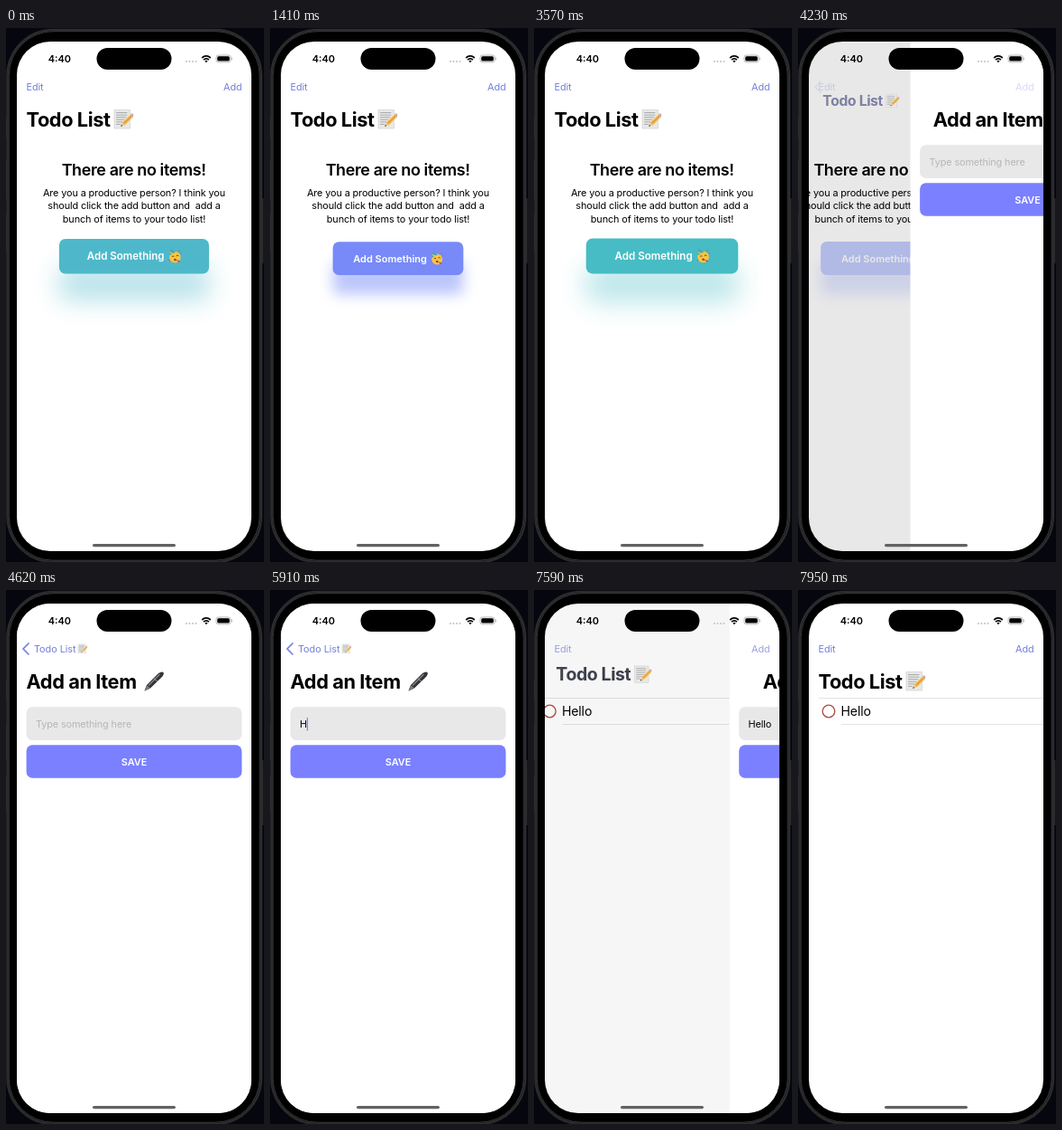
An HTML page that plays this animation: 286x590 px, repeating every 8 s.

```html
<!DOCTYPE html>
<html lang="en">
<head>
<meta charset="utf-8">
<title>Todo List</title>
<style>
  /* --p: button pulse, --q: page push, --n: letters typed */
  @property --p { syntax: "<number>"; inherits: true; initial-value: 0; }
  @property --q { syntax: "<number>"; inherits: true; initial-value: 0; }
  @property --n { syntax: "<number>"; inherits: true; initial-value: 0; }

  html, body { margin: 0; width: 100%; height: 100%; overflow: hidden; background: #06070e; }

  svg.stage {
    --link: #747fdc;
    display: block; width: 100%; height: 100%;
    font: 10.9px Inter, "Open Sans", sans-serif;
    letter-spacing: -.012em;
    animation: pulse 8s linear infinite, push 8s linear infinite, type 8s step-end infinite;
  }
  text { white-space: pre; }
  .mid { text-anchor: middle; }
  .semi { font-weight: 600; letter-spacing: 0; }
  .large { font-size: 21.8px; font-weight: 700; letter-spacing: -.02em; }
  .heading { font-size: 17.95px; font-weight: 600; letter-spacing: -.021em; }
  .link { fill: var(--link); }

  @keyframes pulse {
    0% { --p: .6; animation-timing-function: cubic-bezier(.35, .51, .64, 1); }
    12.8% { --p: 0; animation-timing-function: ease-in-out; }
    35.4% { --p: 1; animation-timing-function: ease-in-out; }
    58%, 100% { --p: 0; }
  }
  /* Both page moves follow a critically damped spring */
  @keyframes push {
    0% { --q: 0; }
    51% { --q: 0; animation-timing-function: linear(0, .15, .4, .61, .76, .86, .92, .955, .975, .988, 1); }
    57.75% { --q: 1; }
    91.6% { --q: 1; animation-timing-function: linear(0, .15, .4, .61, .76, .86, .92, .955, .975, .988, 1); }
    99.3%, 100% { --q: 0; }
  }
  @keyframes type {
    0% { --n: 0; }
    73.875% { --n: 1; }
    77.625% { --n: 2; }
    78% { --n: 3; }
    79.875% { --n: 4; }
    81.75%, 100% { --n: 5; }
  }

  .list { transform: translateX(calc(var(--q) * -78px)); }
  .dim { opacity: calc(var(--q) * .16); }
  .form { transform: translateX(calc((1 - var(--q)) * 260px)); }
  .form .large, .form .pen { transform: translateX(calc((1 - var(--q)) * 34px)); }
  .actions { opacity: calc(1 - var(--q) * 1.25); }
  .chevron { opacity: calc(2 * var(--q) - 1); }
  .title {
    transform: translate(calc(22.5px + 8.5px * var(--q)), calc(109px - 40px * var(--q)))
               scale(calc(1 - .5 * var(--q)));
  }
  .title .large { opacity: calc(1 - var(--q)); }
  .title .back { font-size: 21.8px; opacity: var(--q); }

  .empty { animation: leave 8s step-end infinite; }
  .rows { animation: enter 8s step-end infinite; }
  @keyframes leave { 0% { visibility: visible; } 80%, 100% { visibility: hidden; } }
  @keyframes enter { 0% { visibility: hidden; } 80%, 100% { visibility: visible; } }

  .button {
    --w: calc(140.9px + 26.5px * var(--p));
    --tint: rgb(calc(122 - 25 * var(--p) - 80 * var(--p) * var(--p)),
                calc(128 + 103 * var(--p) - 17 * var(--p) * var(--p)),
                calc(255 - 77 * var(--p) - 20 * var(--p) * var(--p)));
    transform: translate(142px, calc(255px - 4.6px * var(--p))) scale(calc(1 + .1 * var(--p)));
    animation: tap 8s linear infinite;
  }
  @keyframes tap {
    0%, 50.8% { opacity: 1; }
    51.3% { opacity: .25; }
    57.5%, 100% { opacity: 1; }
  }
  .button rect {
    x: calc(var(--w) / -2); y: -18.2px; width: var(--w); height: 36.4px; rx: 6.6px;
    fill: var(--tint);
  }
  .button .shadow {
    y: calc(1.8px + 13.2px * var(--p));
    opacity: calc(.5 - .17 * var(--p));
    filter: blur(calc(6px + 12px * var(--p)));
  }

  .hint { fill: #b6b6ba; opacity: calc(1 - var(--n)); }
  .typed tspan { fill-opacity: calc(var(--n) - var(--i)); }
  .caret { fill: #8088f5; animation: caret-x 8s step-end infinite, blink 8s linear infinite; }
  @keyframes caret-x {
    0% { transform: none; }
    73.875% { transform: translateX(8px); }
    77.625% { transform: translateX(14.2px); }
    78% { transform: translateX(16.7px); }
    79.875% { transform: translateX(19.2px); }
    81.75%, 100% { transform: translateX(25.6px); }
  }
  @keyframes blink {
    0%, 64.87% { opacity: 0; }
    64.875%, 70.6% { opacity: 1; }
    72%, 73.87% { opacity: 0; }
    73.875%, 87.5% { opacity: 1; }
    89.25%, 100% { opacity: 0; }
  }
</style>
</head>
<body>
<svg class="stage" viewBox="0 0 286 590">
  <defs>
    <clipPath id="screen"><rect x="12" y="15" width="260" height="563" rx="37"/></clipPath>

    <symbol id="memo" viewBox="0 0 22 22">
      <path d="M1 1H18V21H1Z" fill="#e9e9e6" stroke="#c9c9c6" stroke-width=".6"/>
      <path d="M3 4H15M3 6.5H15M3 9H14M3 11.5H12M3 14H10M3 16.5H8" stroke="#a0a3a8" stroke-width=".9"/>
      <path d="M8 19L9.800 14.500L18.500 6L21.200 8.800L12.600 17.300Z" fill="#f3b94a"/>
      <path d="M11.300 15.800L19.800 7.400" stroke="#dd9432" stroke-width="1"/>
      <path d="M8 19L9.800 14.500L12.600 17.300Z" fill="#e5cda5"/>
      <path d="M8 19L8.800 17L10 18.200Z" fill="#333"/>
      <path d="M18.500 6L19.500 5Q21 4.600 21.900 6Q22.300 7.200 21.200 8.800Z" fill="#d3a69a"/>
    </symbol>

    <symbol id="pen" viewBox="0 0 24 24">
      <path d="M1.5 22.5L4 16L17 3Q20.5 .5 22.5 2Q23.5 4 21 7L8 19.5Z" fill="#333439"/>
      <path d="M6 16.5L18.5 4" stroke="#85878d" stroke-width="1.3"/>
      <path d="M1.5 22.5L4 16L8 19.5Z" fill="#77797e"/>
      <path d="M12 8.5L15.5 12" stroke="#a5a7ab"/>
    </symbol>

    <symbol id="party" viewBox="0 0 16 16">
      <circle cx="8" cy="9" r="6.3" fill="#fbc53c"/>
      <path d="M2 7L3 0L8.5 3.6Z" fill="#4aa3b8"/>
      <path d="M2.5 3.8L6 5.2" stroke="#f2d25a" stroke-width="1.2"/>
      <path d="M4.5 8.5Q5.5 7 6.8 8.3M9.3 7.7Q10.5 6.3 11.8 7.5" fill="none" stroke="#60401f"/>
      <path d="M8 11.5L13.5 13L13 15Z" fill="#c94b4b"/>
      <circle cx="8" cy="11.7" r="1.3" fill="#7b4a20"/>
      <path d="M12 2.5L13.5 1.5M14 5L15.5 4.5M1 12L2 13" stroke="#e05a5a" stroke-width="1.2"/>
    </symbol>
  </defs>

  <!-- Phone body -->
  <path d="M.5 98V122M.5 146V189M.5 205V247M284.5 188V260" stroke="#29292c" stroke-width="2"/>
  <rect x="1.5" y="2" width="281.5" height="588" rx="51" fill="#000" stroke="#2b2c2e" stroke-width="2.4"/>
  <rect x="3.2" y="3.7" width="278" height="584.5" rx="49" fill="none" stroke="#48494b" stroke-width=".8"/>

  <g clip-path="url(#screen)">
    <rect x="12" y="15" width="260" height="563" fill="#fff"/>

    <g class="list">
      <g class="empty">
        <text class="heading mid" x="141.6" y="163">There are no items!</text>
        <g class="mid">
          <text x="142" y="185.5">Are you a productive person? I think you</text>
          <text x="142" y="200.1">should click the add button and  add a</text>
          <text x="142" y="214.7">bunch of items to your todo list!</text>
        </g>
        <g class="button">
          <rect class="shadow"/>
          <rect/>
          <text class="semi" x="-49.3" y="4" fill="#fff">Add Something</text>
          <use href="#party" x="35.3" y="-7.5" width="15" height="15"/>
        </g>
      </g>
      <g class="rows">
        <path d="M23 119.5H272M48 148.5H272" stroke="#e4e4e6"/>
        <circle cx="34" cy="134" r="6.8" fill="none" stroke="#b0493c" stroke-width="1.3"/>
        <text x="47.5" y="139.2" font-size="14.1">Hello</text>
      </g>
    </g>
    <rect class="dim" x="12" y="15" width="260" height="563"/>

    <g class="form">
      <rect x="12" y="15" width="260" height="563" fill="#fff"/>
      <text class="large" x="22.5" y="109">Add an Item</text>
      <use class="pen" href="#pen" x="152" y="89" width="24" height="24"/>
      <rect x="22.6" y="129.3" width="238.8" height="36.6" rx="6.6" fill="#e8e8e8"/>
      <text class="hint" x="33" y="152.2">Type something here</text>
      <text class="typed" x="33" y="152.2"><tspan style="--i:0">H</tspan><tspan style="--i:1">e</tspan><tspan style="--i:2">l</tspan><tspan style="--i:3">l</tspan><tspan style="--i:4">o</tspan></text>
      <rect class="caret" x="32.8" y="141" width="1.3" height="14.5"/>
      <rect x="22.6" y="171.3" width="238.8" height="36.4" rx="6.6" fill="#7a80ff"/>
      <text class="semi mid" x="142" y="193.5" fill="#fff">SAVE</text>
    </g>

    <!-- Navigation bar -->
    <g class="actions link">
      <text x="22.5" y="69">Edit</text>
      <text x="261.5" y="69" text-anchor="end">Add</text>
    </g>
    <path class="chevron" d="M25 59L19 65L25 71" fill="none" stroke="#747fdc" stroke-width="1.7" stroke-linecap="round" stroke-linejoin="round"/>
    <g class="title">
      <text class="large">Todo List</text>
      <text class="back link">Todo List</text>
      <use href="#memo" x="96.5" y="-19.5" width="22.5" height="22.5"/>
    </g>

    <!-- Status bar -->
    <text class="semi" x="46.8" y="38">4:40</text>
    <rect x="100.5" y="22" width="83" height="24" rx="12"/>
    <path d="M200 37H211" stroke="#c6c6c8" stroke-width="2.2" stroke-linecap="round" stroke-dasharray="0 3.5"/>
    <path d="M217.2 33Q222 28.8 226.8 33M219 35.2Q222 32.6 225 35.2" fill="none" stroke="#000" stroke-width="1.7"/>
    <path d="M220.4 36.4Q222 35.2 223.6 36.4L222 38.2Z"/>
    <rect x="233" y="30" width="16" height="7.8" rx="2.5" fill="none" stroke="#a5a5a5" stroke-width=".8"/>
    <rect x="234.2" y="31.2" width="13.6" height="5.4" rx="1.5"/>
    <path d="M250.2 32.5V35.3" stroke="#a5a5a5"/>
    <rect x="96" y="570" width="92" height="3.2" rx="1.6" fill="#626262"/>
  </g>
</svg>
</body>
</html>
```
